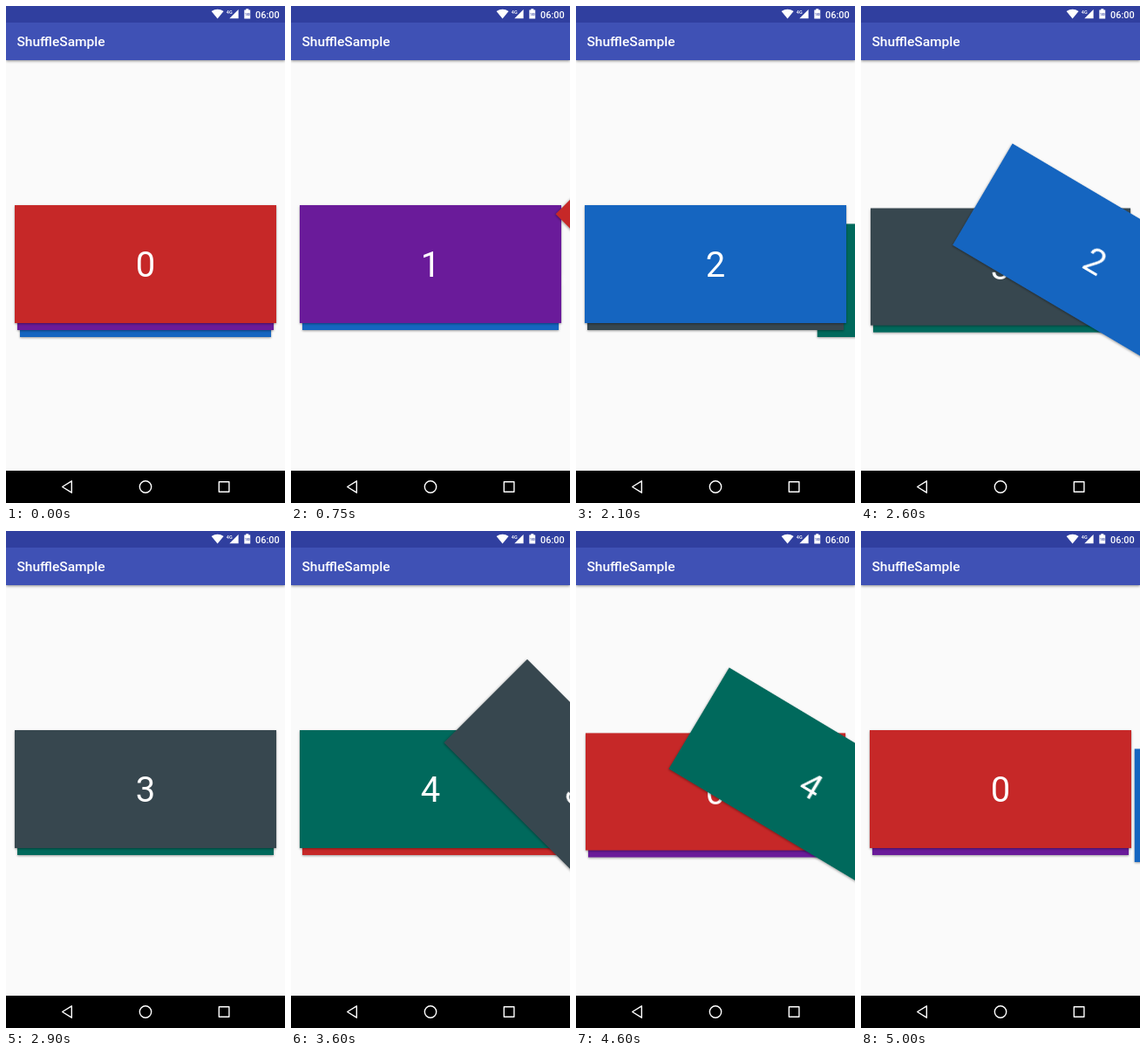
Write an HTML page that moves like this. It is 320 by 569 pixels and loops after 5050 ms.

```html
<!DOCTYPE html>
<html lang="en">
<head>
<meta charset="utf-8">
<title>ShuffleSample</title>
<style>
  html, body { margin: 0; width: 100%; height: 100%; overflow: hidden; }
  body { position: relative; background: #fafafa; font-family: Roboto, sans-serif; color: #fff; }
  #stage { position: absolute; left: 0; top: 0; width: 320px; height: 569px; overflow: hidden; }
  .bar {
    position: absolute; left: 0; top: 0; width: 320px; height: 62.2px;
    background: linear-gradient(#303f9f 18.6px, #3f51b5 18.6px);
    box-shadow: 0 1px 3px rgba(0, 0, 0, .45);
  }
  .nav { position: absolute; left: 0; top: 531.7px; width: 320px; height: 38px; background: #000; }
  svg { position: absolute; left: 0; top: 0; }
  text { fill: #fff; font-family: Roboto, sans-serif; font-weight: 500; }
  .card {
    position: absolute; left: 10px; top: 228px; width: 300px; height: 135px;
    box-shadow: 0 1px 2.5px rgba(0, 0, 0, .38);
    font-size: 40px; line-height: 138px; text-align: center;
    will-change: transform;
  }
  #dot {
    position: absolute; left: -10px; top: -10px; width: 20px; height: 20px; border-radius: 50%;
    background: radial-gradient(circle, rgba(255, 255, 255, .85) 5px, rgba(255, 255, 255, .7) 7px,
      rgba(255, 255, 255, .3) 8.3px, rgba(255, 255, 255, 0) 9.8px);
  }
</style>
</head>
<body>
<div id="stage">
  <div id="deck"></div>
  <div class="bar"></div>
  <div class="nav"></div>
  <svg width="320" height="569" viewBox="0 0 320 569">
    <g fill="#fff">
      <path d="M242.6 14.4 L235.6 6 Q242.6 1.6 249.6 6 Z"/>
      <path d="M266.6 4 V14.3 H256.3 Z"/>
      <path d="M275.2 4.4 V3.2 H278.3 V4.4 H280.2 V14.6 H273.3 V4.4 Z"/>
    </g>
    <text x="252.8" y="8.6" font-size="5.5">4G</text>
    <text x="274" y="11" font-size="3.4" style="fill:#303f9f">100</text>
    <text x="286" y="13.5" font-size="10.9">06:00</text>
    <text x="12.4" y="46.3" font-size="15.56">ShuffleSample</text>
    <g fill="none" stroke="#fff" stroke-width="1.4" stroke-linejoin="round">
      <path d="M75.3 543.8 V557.2 L64.6 550.5 Z"/>
      <circle cx="160" cy="550.5" r="6.7"/>
      <rect x="244.3" y="544.8" width="11.6" height="11.4"/>
    </g>
  </svg>
  <div id="dot"></div>
</div>
<script>
const LOOP = 5050, ANIM = 300, FADE = 260;
const HALF = 160, DRAG = 235, EXIT = 480;
const colors = ['#c62828', '#6a1b9a', '#1565c0', '#37474f', '#00695c'];

// finger down, finger up, vertical drift, finger height at the end
const swipes = [
  { down: 300, up: 650, dy: 1, y: 314 },
  { down: 1450, up: 1716, dy: -7, y: 297 },
  { down: 2500, up: 2700, dy: -8, y: 306 },
  { down: 3500, up: 3635, dy: 7, y: 310 },
  { down: 4550, up: 4650, dy: -9, y: 297 }
];

const deck = document.getElementById('deck');
const dot = document.getElementById('dot');
const cards = colors.map((color, i) => {
  const el = document.createElement('div');
  el.className = 'card';
  el.style.background = color;
  el.textContent = i;
  return deck.appendChild(el);
});

const clamp = v => Math.min(1, Math.max(0, v));
const ease = v => .5 - Math.cos(Math.PI * clamp(v)) / 2;

function place(i, z, x, y, angle, scale) {
  const s = cards[i % cards.length].style;
  s.visibility = 'visible';
  s.zIndex = z;
  s.transform = `translate(${x}px, ${y}px) rotate(${angle}deg) scale(${scale})`;
}

function placeSlot(i, slot, z, x = 0) {
  place(i, z, x, 9.35 * slot, 0, 1 - .02 * slot);
}

function draw(t) {
  let n = 0;
  while (n < swipes.length - 1 && t >= swipes[n + 1].down) n++;
  const { down, up, dy, y } = swipes[n];

  const pull = clamp((t - down) / (up - down)) ** 1.13;
  const dx = DRAG * pull + (EXIT - DRAG) * ease((t - up) / ANIM);
  const p = clamp(dx / HALF);
  const enter = ease((t - up - ANIM) / ANIM);

  for (const card of cards) card.style.visibility = 'hidden';
  if (dx < EXIT) place(n, 4, dx, dy * pull, 45 * p, 1);
  placeSlot(n + 1, 1 - p, 3);
  placeSlot(n + 2, 2 - p, 2);
  if (enter > 0) placeSlot(n + 3, 2, 1, 320 * (1 - enter));

  dot.style.opacity = t < down ? 0 : (1 - clamp((t - up) / FADE)) ** 1.5;
  dot.style.transform = `translate(${72 + DRAG * pull}px, ${y - dy * (1 - pull)}px)`;
}

const start = performance.now();
function tick() {
  draw((performance.now() - start) % LOOP);
  requestAnimationFrame(tick);
}
tick();
</script>
</body>
</html>
```
